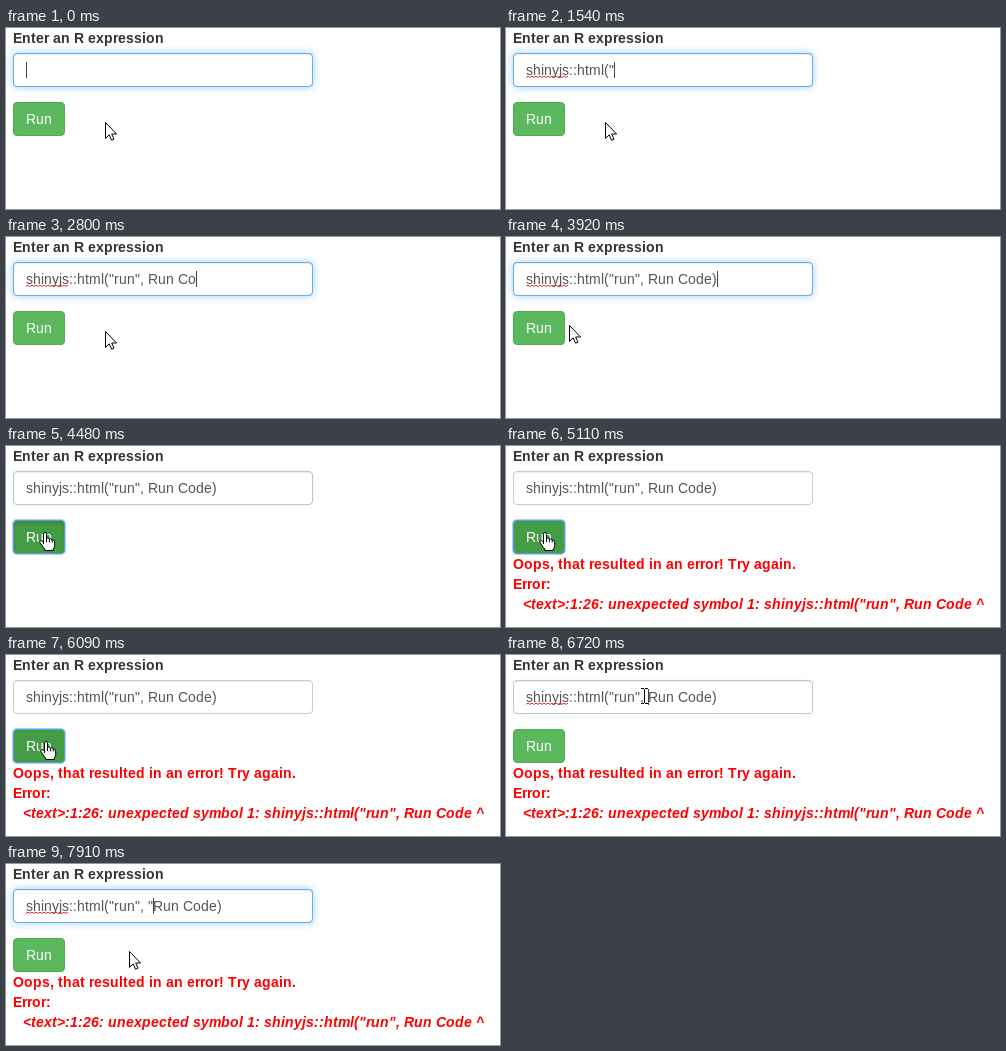
An HTML page for the animation above (8 s loop, 494 by 181 pixels).

```html
<!DOCTYPE html>
<html lang="en">
<head>
<meta charset="utf-8">
<title>R expression runner</title>
<style>
  html, body { margin: 0; width: 494px; height: 181px; overflow: hidden; background: #fff; }
  div, svg { position: absolute; box-sizing: border-box; }
  .field, .glow { left: 7px; top: 25px; width: 300px; height: 34px; border-radius: 4px; }
  .field { border: 1px solid #ccc; box-shadow: inset 0 1px 1px rgba(0,0,0,.075); }
  .glow { border: 1px solid #66afe9; box-shadow: 0 0 8px rgba(102,175,233,.6); }
  .button { left: 7px; top: 74px; width: 52px; height: 34px; border-radius: 4px;
            background: #5cb85c; border: 1px solid #4cae4c; }
  .button.hover { background: #449d44; border-color: #398439; }
  .button.focus { border-color: #5b9fd0; box-shadow: 0 0 0 1px rgba(77,144,254,.45); }
  .button.press { box-shadow: inset 0 3px 5px rgba(0,0,0,.125), 0 0 0 1px rgba(77,144,254,.45); }
  svg { left: 0; top: 0; }
  text { font: 14px "Liberation Sans", Arial, sans-serif; white-space: pre; }
  .bold { font-weight: bold; }
  .slant { font-style: italic; }
</style>
</head>
<body>
<div class="field"></div>
<div class="glow" id="glow"></div>
<div class="button" id="button"></div>
<svg width="494" height="181" viewBox="0 0 494 181">
  <g id="labels"></g>
  <text id="code" y="47" fill="#555"></text>
  <path id="squiggle" fill="none" stroke="#e02020" stroke-width=".9"/>
  <rect id="caret" y="34" width="1" height="16" fill="#444"/>
  <g id="error" fill="#f00"></g>
  <g id="pointer" stroke="#000" fill="#fff" stroke-linejoin="round">
    <path id="arrow" d="M.5 .5V16.4L4.2 12.9 6.6 18.3 9 17.2 6.7 12H11.6Z"/>
    <g id="hand">
      <path d="M-1.5 10.4V1.8Q-1.5 .5 0 .5T1.5 1.8V6.5Q2 5.8 3 6 4.3 6.2 4.4 7.2 5 6.6 6 7 7 7.4 7.2 8.2 9.5 7.6 9.7 10V13.5Q9.6 15.5 8.3 17V18.5H-.2V17Q-2 15.5-3.3 13L-5.2 10.2Q-5.6 8.6-4.2 8.5-3 8.5-1.5 10.4Z"/>
      <path d="M1.5 6.5V10M4.4 7.2V10.3M7.2 8.2V10.6M-1.5 10V12"/>
    </g>
    <path id="beam" fill="none" shape-rendering="crispEdges" d="M-3-7.5H0M1-7.5H4M.5-7V7M-3 7.5H0M1 7.5H4"/>
  </g>
</svg>
<script>
const LOOP = 8000, STEP = 70, BLINK = 350, LEFT = 20;
const BLUR = 4410, FOCUS = 6720;
const $ = id => document.getElementById(id);
const pen = document.createElement('canvas').getContext('2d');

// Glyph advances snap to whole pixels.
function advances(str, left, weight = 'normal') {
  pen.font = `${weight} 14px "Liberation Sans", Arial, sans-serif`;
  const xs = [left];
  for (const ch of str) xs.push(xs[xs.length - 1] + Math.round(pen.measureText(ch).width));
  return xs;
}

function setText(node, str, left, weight) {
  const xs = advances(str, left, weight);
  if (node.textContent !== str) {
    node.textContent = str;
    node.setAttribute('x', xs.slice(0, -1).join(' '));
  }
  return xs;
}

function addText(parent, str, x, y, fill, style = 'bold') {
  const node = document.createElementNS('http://www.w3.org/2000/svg', 'text');
  node.setAttribute('y', y);
  node.setAttribute('class', style);
  if (fill) node.setAttribute('fill', fill);
  setText(node, str, x, style ? 'bold' : 'normal');
  parent.append(node);
}

addText($('labels'), 'Enter an R expression', 7, 15, '#333');
addText($('labels'), 'Run', LEFT, 96, '#fff', '');
addText($('error'), 'Oops, that resulted in an error! Try again.', 7, 123);
addText($('error'), 'Error:', 7, 143);
addText($('error'), '<text>:1:26: unexpected symbol 1: shinyjs::html("run", Run Code ^', 17, 163, '', 'bold slant');

let wave = `M${LEFT} 49.4`;
for (let i = 1; i <= 21; i++) wave += `L${LEFT + 2 * i} ${i % 2 ? 48.2 : 49.4}`;
$('squiggle').setAttribute('d', wave);

// [time, text before the caret, text after it]
const edits = [
  [0, ''], [140, 'shi'], [210, 'shinyj'], [420, 'shinyjs'], [490, 'shinyjs::']
];
const type = (time, added) => edits.push([time, edits[edits.length - 1][1] + added]);
[[560, 'h'], [700, 't'], [770, 'm'], [840, 'l'], [910, '('], [1540, '"'],
 [1680, 'r'], [1750, 'u'], [1820, 'n'], [2030, '"'], [2100, ', '], [2170, 'R'],
 [2310, 'un'], [2450, ' '], [2660, 'C'], [2800, 'o'], [2870, 'd'], [2940, 'e'],
 [3150, ')']].forEach(key => type(...key));
edits.push([FOCUS, 'shinyjs::html("run", ', 'Run Code)'],
           [7910, 'shinyjs::html("run", "', 'Run Code)']);

// [time, x, y] of the pointer hotspot
const path = [
  [3710, 99, 94], [3780, 94, 93], [3850, 80, 90], [3920, 63, 88], [3990, 51, 87],
  [4200, 39, 86], [6020, 39, 86], [6090, 40, 86], [6160, 43, 85], [6300, 60, 75],
  [6510, 116, 48], [6650, 137, 41], [6720, 138, 41], [6790, 141, 41], [6930, 141, 41],
  [7070, 139, 45], [7350, 128, 75], [7490, 124, 85], [7560, 123, 87]
];

const clamp = v => Math.min(1, Math.max(0, v));
const ramp = (t, start, length) => clamp((t - start) / length);
const swing = p => .5 - Math.cos(Math.PI * p) / 2;

function pointerAt(t) {
  const i = path.findIndex(key => key[0] > t);
  if (i === 0) return path[0].slice(1);
  if (i < 0) return path[path.length - 1].slice(1);
  const [a, b] = [path[i - 1], path[i]];
  const p = ramp(t, a[0], b[0] - a[0]);
  return [1, 2].map(k => Math.round(a[k] + (b[k] - a[k]) * p));
}

const show = (id, on) => $(id).style.display = on ? '' : 'none';

function draw(time) {
  const t = Math.floor(time / STEP) * STEP;
  const focused = t < BLUR || t >= FOCUS;

  const [edited, before, after = ''] = edits.filter(key => key[0] <= t).pop();
  const xs = setText($('code'), before + after, LEFT);
  $('caret').setAttribute('x', xs[before.length]);
  show('caret', focused && Math.floor((t - edited) / BLINK) % 2 === 0);
  show('squiggle', focused && t >= 490);
  $('glow').style.opacity = t < 5000 ? 1 - ramp(t, BLUR - 20, 105) : ramp(t, FOCUS - 10, 80);

  const [x, y] = pointerAt(t);
  const overButton = x >= 7 && x < 59 && y >= 74 && y < 108;
  const overField = x >= 7 && x < 307 && y >= 25 && y < 59;
  $('pointer').setAttribute('transform', `translate(${x} ${y})`);
  show('hand', overButton);
  show('beam', overField);
  show('arrow', !overButton && !overField);

  const button = $('button').classList;
  button.toggle('hover', overButton);
  button.toggle('focus', !focused);
  button.toggle('press', t >= BLUR && t < BLUR + 140);

  $('error').setAttribute('opacity', swing(ramp(t, 4580, 500)));
}

const begin = performance.now();
function frame() {
  draw((performance.now() - begin) % LOOP);
  requestAnimationFrame(frame);
}
frame();
</script>
</body>
</html>
```
